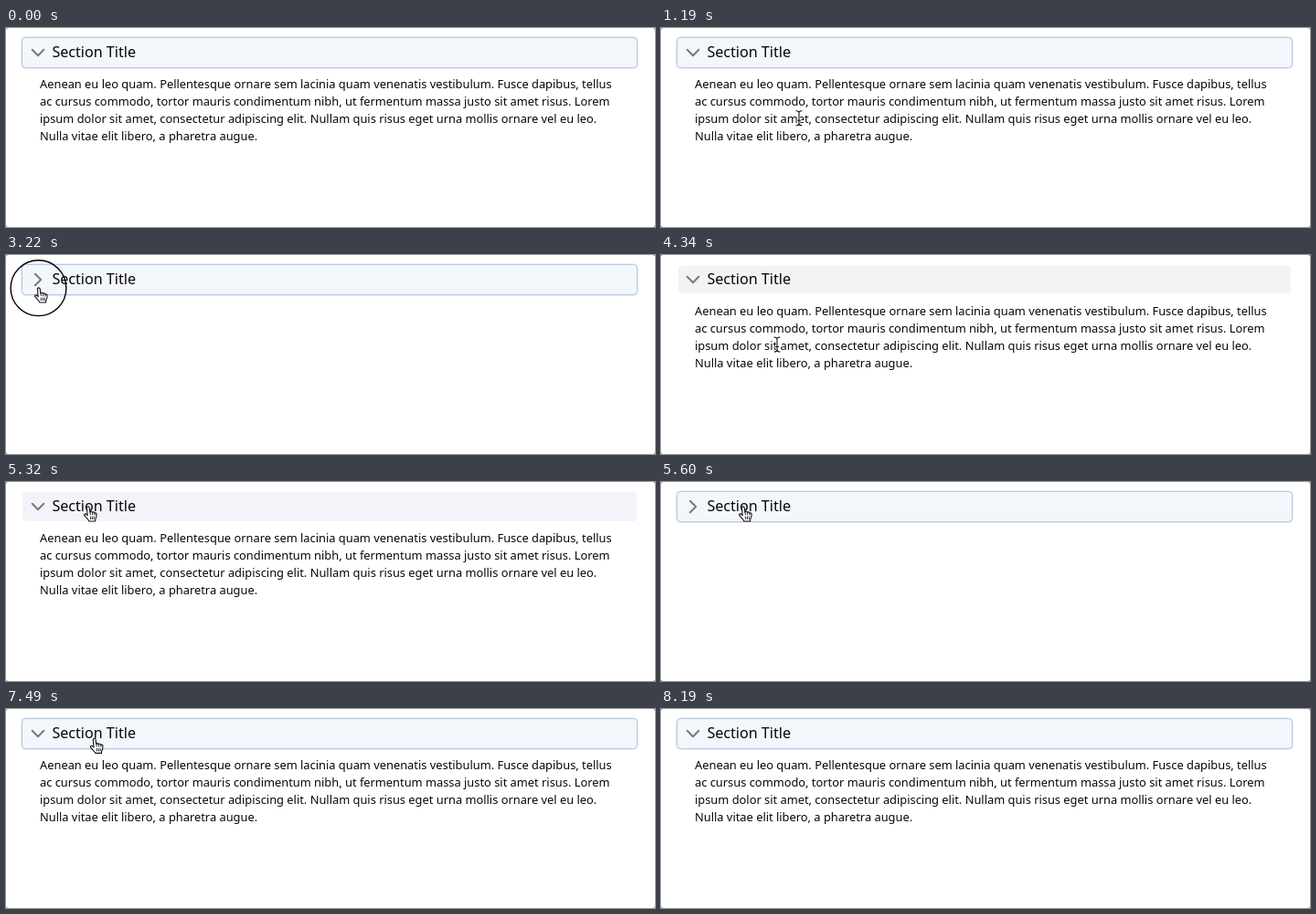
An HTML page for the animation above (8400 ms loop, 710 by 218 pixels).

```html
<!DOCTYPE html>
<html lang="en">
<head>
<meta charset="utf-8">
<title>Expandable section</title>
<style>
  html, body { margin: 0; width: 100%; height: 100%; overflow: hidden; background: #fff; }
  svg { display: block; width: 710px; height: 218px; }
  text { font-family: "Noto Sans", "Open Sans", sans-serif; fill: #080707; }
  .title { font-size: 16.1px; }
  .body { font-size: 12.85px; }
  .line { fill: none; stroke-linecap: round; stroke-linejoin: round; }
</style>
</head>
<body>
<svg viewBox="0 0 710 218">
  <rect width="710" height="218" fill="#777"/>
  <rect width="710" height="218" rx="2.5" fill="#fff"/>

  <rect id="grey" x="19" y="12" width="670" height="30" rx="3" fill="#f3f3f3"/>
  <rect id="hover" x="18" y="11" width="672" height="32" rx="4" fill="#f3f4f9"/>
  <g id="focus">
    <rect x="17.5" y="10.5" width="673" height="33" rx="4" fill="none" stroke="#b4c9e3" stroke-width="3" opacity=".3"/>
    <rect x="17.5" y="10.5" width="673" height="33" rx="4" fill="#f3f6fb" stroke="#b4c9e3"/>
  </g>

  <path id="chevron" class="line" d="M-6.3-3.2 0 3.2 6.3-3.2" stroke="#7a7a7a" stroke-width="2"/>
  <text class="title" x="50.4" y="32">Section Title</text>
  <g id="content">
    <text class="body" x="37" y="66.3">Aenean eu leo quam. Pellentesque ornare sem lacinia quam venenatis vestibulum. Fusce dapibus, tellus</text>
    <text class="body" x="37" y="85.3">ac cursus commodo, tortor mauris condimentum nibh, ut fermentum massa justo sit amet risus. Lorem</text>
    <text class="body" x="37" y="104.3">ipsum dolor sit amet, consectetur adipiscing elit. Nullam quis risus eget urna mollis ornare vel eu leo.</text>
    <text class="body" x="37" y="123.3">Nulla vitae elit libero, a pharetra augue.</text>
  </g>

  <g id="pointer">
    <circle id="ring" cx="-.5" cy=".2" r="30.4" fill="none" stroke="#000" stroke-width="1.4"/>
    <g id="hand" class="line" stroke="#111" stroke-width="1.1">
      <path fill="#fff" d="M-1.6 1.2C-1.6-.6 1-.6 1.2 1.2L1.9 6.2C2.2 4.8 4.3 5 4.5 6.5
        C5 5.4 6.9 5.8 7 7.2C7.7 6.3 9.2 6.9 9.1 8.4C9.2 11 8.6 12.4 7.8 13.7L7.6 16H.9
        C.2 14.2-2.2 12.4-4.2 9.7C-5 8.2-3.2 7.3-2 8.5L-.8 9.6Z"/>
      <path stroke-width=".9" d="M2 6.2 2.4 8.6M4.5 6.6 4.7 8.8M7 7.3V9M2.4 11V13.6M4.4 11V13.6M6.3 11V13.6"/>
    </g>
    <g id="beam" class="line">
      <path d="M-3-8Q0-8 0-6V6Q0 8-3 8M3-8Q0-8 0-6V6Q0 8 3 8M-1.5 2.5H1.5" stroke="#fff" stroke-width="2.4"/>
      <path d="M-3-8Q0-8 0-6V6Q0 8-3 8M3-8Q0-8 0-6V6Q0 8 3 8M-1.5 2.5H1.5" stroke="#111" stroke-width="1.1"/>
    </g>
    <path id="arrow" d="M0 0V13.6L3.2 10.7 5.3 15.6 7.6 14.6 5.5 9.8H9.8Z" fill="#000" stroke="#fff" stroke-width="1"/>
  </g>
</svg>
<script>
const LOOP = 8400, STEP = 70;
const el = id => document.getElementById(id);
const show = (id, on) => { el(id).style.display = on ? "" : "none"; };
const within = (t, a, b) => t >= a && t < b;

// Pointer strokes: start, end, target x, target y
const start = [533, 220];
const moves = [
  [0, 700, 338, 195],
  [840, 1750, 37, 40],
  [1750, 1960, 36, 36],
  [3500, 3990, 133.4, 110.3],
  [4270, 5180, 90, 27],
  [7350, 8190, 338, 220]
];
const clicks = [[1960, 2240], [3080, 3360], [5390, 5600], [6790, 7070]];

function pointerAt(t) {
  let [x, y] = start;
  for (const [a, b, tx, ty] of moves) {
    if (t <= a) break;
    const p = Math.min(1, (t - a) / (b - a));
    // Leaving accelerates, every other stroke slows down
    const k = ty > 218 ? p * p : 1 - (1 - p) ** 2;
    x += (tx - x) * k;
    y += (ty - y) * k;
  }
  return [x, y];
}

function draw(t) {
  const open = !within(t, 2240, 3290) && !within(t, 5530, 7000);
  show("content", open);
  el("chevron").setAttribute("transform", `translate(35 27) rotate(${open ? 0 : -90})`);

  const idle = within(t, 3780, 5320), hovered = within(t, 5320, 5390);
  show("grey", idle);
  show("hover", hovered);
  show("focus", !idle && !hovered);

  const [x, y] = pointerAt(t);
  el("pointer").setAttribute("transform", `translate(${x} ${y})`);
  show("pointer", t > 0 && t < 8190);
  show("ring", clicks.some(([a, b]) => within(t, a, b)));
  show("hand", y < 46);
  show("beam", y >= 46 && y < 128);
  show("arrow", y >= 128);
}

const began = performance.now();
function tick() {
  const t = (performance.now() - began) % LOOP;
  draw(Math.floor(t / STEP) * STEP);
  requestAnimationFrame(tick);
}
tick();
</script>
</body>
</html>
```
